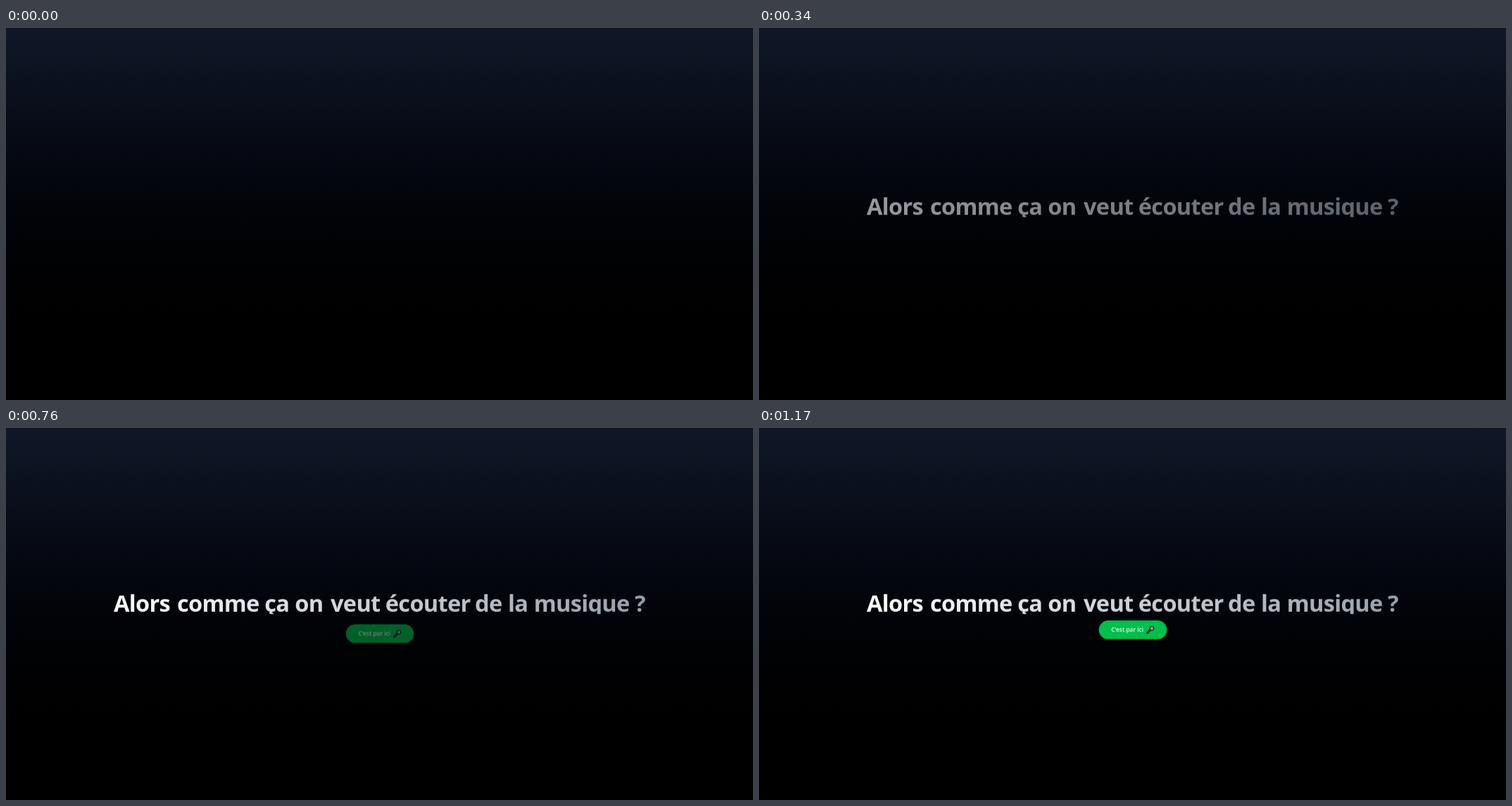
Animation of 1061x528 px, one loop 3050 ms. Source, as an HTML page:

```html
<!DOCTYPE html>
<html lang="fr">
<head>
<meta charset="utf-8">
<title>Musique</title>
<style>
  html, body {
    margin: 0;
    width: 100%;
    height: 100%;
    overflow: hidden;
    background: #000;
  }
  body { background: linear-gradient(to bottom in oklab, #101828, #000); }
  svg { display: block; width: 1061px; height: 528px; }
  text { font-family: "Open Sans", "Noto Sans", sans-serif; }
  #title, #button { opacity: 0; }
  #title text { font-size: 32.6px; font-weight: 700; letter-spacing: -.7px; }
  #button text { font-size: 8.4px; font-weight: 600; }
</style>
</head>
<body>
<svg viewBox="0 0 1061 528">
  <defs>
    <linearGradient id="fade" gradientUnits="userSpaceOnUse" x1="153" x2="909" y1="0" y2="0">
      <stop stop-color="#fff"/>
      <stop offset="1" stop-color="#99a1af"/>
    </linearGradient>
    <clipPath id="line"><rect x="140" y="228" width="780" height="36"/></clipPath>
  </defs>

  <g id="title">
    <text y="261" fill="url(#fade)" clip-path="url(#line)"></text>
  </g>

  <g id="button">
    <rect x="482.7" y="272.7" width="96.7" height="26.6" rx="13.3" fill="#00c950"/>
    <text x="500.2" y="289.1" fill="#fff">C'est par ici</text>
    <g stroke-linecap="round">
      <path d="M551.6 290.2L557 285" stroke="#111" stroke-width="3"/>
      <path d="M551.7 290.1L556 286" stroke="#8b9490" stroke-width="1"/>
      <circle cx="558" cy="284" r="2.8" fill="#a3aaa7" stroke="#111"/>
    </g>
  </g>
</svg>
<script>
  const LOOP = 3050, FADE = 800, RISE = 11.3;

  const words = [
    ["Alors", 153], ["comme", 243], ["ça", 367.3], ["on", 410.3], ["veut", 461],
    ["écouter", 538.8], ["de", 666], ["la", 713], ["musique", 749.7], ["?", 893]
  ];
  const line = document.querySelector("#title text");
  for (const [word, x] of words) {
    const span = document.createElementNS(line.namespaceURI, "tspan");
    span.setAttribute("x", x);
    span.textContent = word;
    line.append(span);
  }

  // Uneven 70 ms ticks; the last one holds until the loop ends.
  const ticks = Array.from({ length: 18 }, (_, k) =>
    70 * k - (k < 3 ? 0 : k < 13 ? 10 : 20));

  // cubic-bezier(0, 0, .58, 1), solved by bisection
  function easeOut(x) {
    if (x <= 0) return 0;
    if (x >= 1) return 1;
    let low = 0, high = 1;
    for (let i = 0; i < 24; i++) {
      const s = (low + high) / 2;
      if (1.74 * (1 - s) * s * s + s ** 3 < x) low = s; else high = s;
    }
    return 3 * (1 - low) * low * low + low ** 3;
  }

  function fadeUp(id, delay) {
    const pose = (time, at = time) => {
      const p = easeOut((time - delay) / FADE);
      return {
        offset: at / LOOP,
        opacity: p,
        transform: `translateY(${RISE * (1 - p)}px)`,
        easing: "steps(1, end)"
      };
    };
    const frames = ticks.map(time => pose(time));
    frames.push(pose(ticks.at(-1), LOOP));
    return document.getElementById(id).animate(frames, { duration: LOOP, iterations: Infinity });
  }

  const start = document.timeline.currentTime;
  for (const motion of [fadeUp("title", 0), fadeUp("button", 500)]) motion.startTime = start;
</script>
</body>
</html>
```
